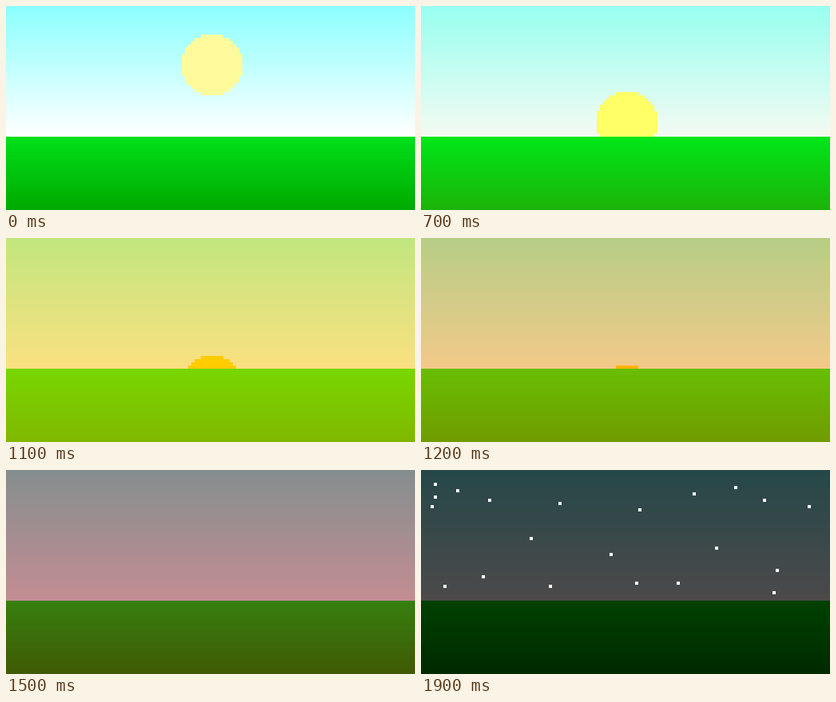
Write an HTML page with a canvas that moves like this. It is 512 px wide and 256 px high and loops after 2000 ms.

```html
<!DOCTYPE html>
<html lang="en">
<head>
<meta charset="utf-8">
<title>Sunset</title>
<style>
  html, body { margin: 0; width: 100%; height: 100%; overflow: hidden; }
  canvas { display: block; width: 512px; height: 256px; image-rendering: pixelated; }
</style>
</head>
<body>
<canvas id="stage" width="128" height="64"></canvas>
<script>
const ctx = document.getElementById('stage').getContext('2d');
const STEP = 100, STEPS = 20;
const WIDTH = 128, HEIGHT = 64, HORIZON = 41;
const SUN_X = 64, SUN_REACH = 9;

// Keyed by step: sky top, sky bottom, ground top, ground bottom
const palettes = [
  [0, '8cffff', 'ffffff', '00e018', '00aa00'],
  [6, '8cffff', 'ffffff', '00e018', '00aa00'],
  [7, '98fff0', 'f4faf2', '00e618', '1cb408'],
  [9, 'a9ffac', 'faf6b4', '50e804', '48c200'],
  [11, 'c2e67e', 'fae080', '78d600', '80b800'],
  [14, 'a09c96', 'e29c9c', '4a8c0a', '506400'],
  [17, '50727f', '836f80', '106418', '20480c'],
  [19, '264849', '4c494a', '004000', '002a00']
].map(([step, ...colors]) => [step, ...colors.map(parseColor)]);

const sunColors = [
  [0, 'fffa9c'], [6, 'fffa9c'], [7, 'ffff66'], [9, 'ffff00'], [12, 'ffb300']
].map(([step, color]) => [step, parseColor(color)]);

const sunTops = [[0, [9]], [7, [27]], [9, [33]], [11, [37]], [12, [40]], [13, [42]]];

// In order of appearance
const stars = [
  [21, 9], [107, 9], [67, 35], [43, 10], [121, 11], [92, 24], [19, 33],
  [4, 4], [34, 21], [85, 7], [40, 36], [111, 31], [68, 12], [11, 6],
  [4, 8], [3, 11], [7, 36], [59, 26], [98, 5], [80, 35], [110, 38]
];
const starCounts = { 16: 3, 17: 7, 18: 14, 19: 21 };

function parseColor(hex) {
  return [0, 2, 4].map(i => parseInt(hex.slice(i, i + 2), 16));
}

function mix(a, b, t) {
  return a.map((value, i) => value + (b[i] - value) * t);
}

function sample(keys, step) {
  const next = keys.findIndex(key => key[0] >= step);
  if (next < 0) return keys[keys.length - 1].slice(1);
  if (next === 0) return keys[0].slice(1);
  const [from, ...a] = keys[next - 1];
  const [to, ...b] = keys[next];
  return a.map((value, i) => mix(value, b[i], (step - from) / (to - from)));
}

function fill(color, x, y, width, height) {
  ctx.fillStyle = `rgb(${color.map(Math.round).join(',')})`;
  ctx.fillRect(x, y, width, height);
}

function drawGradient(top, bottom, start, end) {
  for (let y = start; y < end; y++) {
    fill(mix(top, bottom, (y - start) / (end - start - 1)), 0, y, WIDTH, 1);
  }
}

function drawSun(step) {
  const top = Math.round(sample(sunTops, step)[0][0]);
  const [color] = sample(sunColors, step);
  for (let dy = -SUN_REACH; dy <= SUN_REACH; dy++) {
    const y = top + SUN_REACH + dy;
    if (y >= HORIZON) break;
    const reach = Math.floor(Math.sqrt((SUN_REACH + 0.5) ** 2 - dy * dy));
    fill(color, SUN_X - reach, y, 2 * reach + 1, 1);
  }
}

function draw(step) {
  const [skyTop, skyBottom, groundTop, groundBottom] = sample(palettes, step);
  drawGradient(skyTop, skyBottom, 0, HORIZON);
  drawSun(step);
  drawGradient(groundTop, groundBottom, HORIZON, HEIGHT);
  for (const [x, y] of stars.slice(0, starCounts[step] || 0)) {
    fill([255, 255, 255], x, y, 1, 1);
  }
}

function tick() {
  draw(Math.floor(performance.now() / STEP) % STEPS);
  requestAnimationFrame(tick);
}
tick();
</script>
</body>
</html>
```
